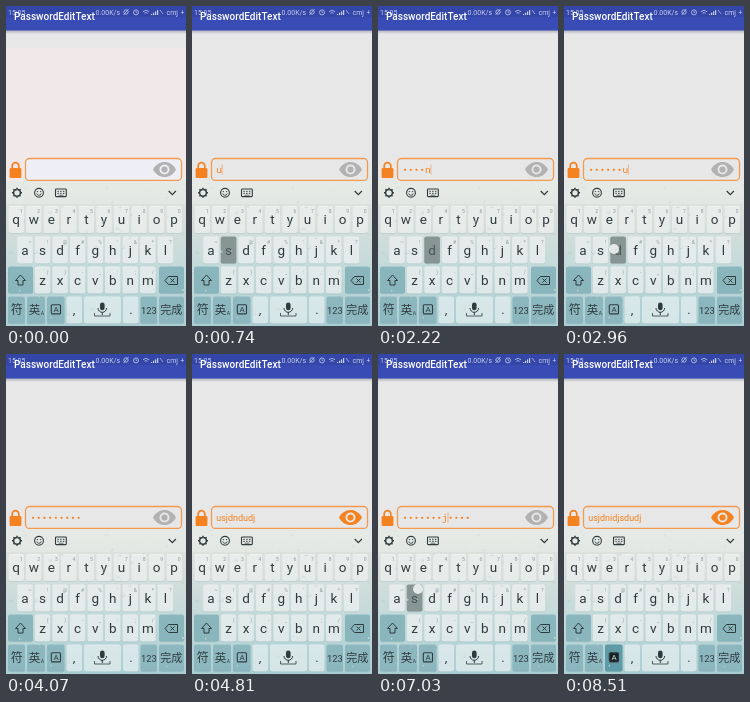
An HTML page with a canvas that plays this animation: 180x320 px, repeating every 8880 ms.

```html
<!DOCTYPE html>
<html lang="en">
<head>
<meta charset="utf-8">
<title>Password field</title>
<style>
html, body { margin: 0; width: 100%; height: 100%; overflow: hidden; background: #e7e7e7; }
canvas { display: block; width: 180px; height: 320px; }
</style>
</head>
<body>
<canvas id="stage"></canvas>
<script>
const canvas = document.getElementById('stage');
const ratio = window.devicePixelRatio || 1;
canvas.width = 180 * ratio;
canvas.height = 320 * ratio;
const c = canvas.getContext('2d');

const STEP = 370, STEPS = 24;
const ORANGE = '#f58220', INK = '#303b3e', PAPER = '#e7e7e7';
const FIRST = 'usjdndudj', ADDED = 'idjs', SPLIT = 5;
const CELL = 5.7, KEY_PITCH = 17.55;
const SANS = 'Roboto, sans-serif', MONO = '"Noto Sans Mono", monospace';
const CJK = '"Noto Sans CJK SC", "Noto Sans CJK", sans-serif';
// finger positions by step
const TOUCHES = { 4: [46, 237], 8: [50, 243], 17: [50, 248], 19: [40, 235] };

function text(s, x, y, size, color, { align = 'left', weight = 400, family = SANS } = {}) {
  c.font = `${weight} ${size}px ${family}`;
  c.textAlign = align;
  c.textBaseline = 'alphabetic';
  c.fillStyle = color;
  c.fillText(s, x, y);
}

function box(x, y, w, h, r, fill, stroke, width = 1) {
  c.beginPath();
  c.roundRect(x, y, w, h, r);
  if (fill) { c.fillStyle = fill; c.fill(); }
  if (stroke) { c.strokeStyle = stroke; c.lineWidth = width; c.stroke(); }
}

function disc(x, y, r, fill) {
  c.beginPath();
  c.arc(x, y, r, 0, 7);
  c.fillStyle = fill;
  c.fill();
}

function ring(x, y, r, color, width = 1, from = 0, to = 7) {
  c.beginPath();
  c.arc(x, y, r, from, to);
  c.strokeStyle = color;
  c.lineWidth = width;
  c.stroke();
}

function line(points, color, width = 1, close = false) {
  c.beginPath();
  points.forEach(([x, y]) => c.lineTo(x, y));
  if (close) c.closePath();
  c.strokeStyle = color;
  c.lineWidth = width;
  c.stroke();
}

function stateAt(step) {
  let value = '', recent = -1, pressed = '';
  if (step < 15) {
    const count = Math.max(0, Math.min(9, step - 1));
    value = FIRST.slice(0, count);
    if (step >= 2 && step <= 10) recent = count - 1;
    if (step >= 1 && step <= 9) pressed = FIRST[step - 1];
  } else {
    const count = Math.max(0, Math.min(4, step - 16));
    value = FIRST.slice(0, SPLIT) + ADDED.slice(0, count) + FIRST.slice(SPLIT);
    if (step >= 17 && step <= 20) recent = SPLIT + count - 1;
    if (step >= 16 && step <= 19 && step !== 17) pressed = ADDED[step - 16];
  }
  const shown = (step >= 12 && step <= 14) || step >= 22;
  const cursor = step === 15 || step === 16 ? SPLIT : recent + 1;
  return { step, value, recent, pressed, shown, cursor };
}

function drawHeader() {
  const shadow = c.createLinearGradient(0, 24, 0, 28);
  shadow.addColorStop(0, '#a9abb8');
  shadow.addColorStop(1, '#a9abb800');
  c.fillStyle = shadow;
  c.fillRect(0, 24, 180, 4);
  c.fillStyle = '#394cb5';
  c.fillRect(0, 0, 180, 24.5);
  c.fillStyle = '#3446a8';
  c.fillRect(0, 0, 180, 11);

  const pale = '#c6cdef';
  text('15:05', 2, 9, 7, pale);
  text('...0.00K/s', 84, 9, 7, pale);
  ring(120, 6, 2.2, pale, 0.8);
  line([[117.5, 9], [122.5, 3]], pale, 0.7);
  ring(130, 6.4, 2.5, pale, 0.8);
  line([[130, 4.8], [130, 6.5], [131.3, 6.5]], pale, 0.6);
  ring(140, 9, 4.5, pale, 0.8, -2.3, -0.8);
  ring(140, 9, 2.3, pale, 0.8, -2.3, -0.8);
  c.fillStyle = pale;
  for (let i = 0; i < 4; i++) c.fillRect(145 + i * 2, 8 - i * 1.3, 1.2, 1 + i * 1.3);
  line([[154, 4], [157, 8]], pale, 0.7);
  text('cmj', 160.5, 9, 7, pale);
  text('+', 174.5, 9, 6.5, pale);
  text('PasswordEditText', 8, 14.2, 10, '#fff', { weight: 500 });
}

function drawLock() {
  ring(9.5, 160, 3.3, ORANGE, 1.7, Math.PI, Math.PI * 2);
  line([[6.2, 160], [6.2, 163]], ORANGE, 1.7);
  line([[12.8, 160], [12.8, 163]], ORANGE, 1.7);
  box(3.6, 162, 11.8, 10, 1.2, ORANGE);
}

function drawEye(color, back) {
  c.beginPath();
  c.moveTo(147, 163.5);
  c.bezierCurveTo(152, 153.5, 165, 153.5, 170, 163.5);
  c.bezierCurveTo(165, 173.5, 152, 173.5, 147, 163.5);
  c.fillStyle = color;
  c.fill();
  disc(158.5, 163.5, 5, back);
  disc(158.5, 163.5, 3.1, color);
}

function drawField(s) {
  const back = s.step ? PAPER : '#eeeff6';
  drawLock();
  box(19.5, 152.5, 156, 22, 4, back, '#f29a50', 1.3);
  drawEye(s.shown ? ORANGE : '#b2b2b2', back);
  if (s.shown) {
    text(s.value, 24.2, 167, 9, ORANGE);
    return;
  }
  const left = 24.2;
  [...s.value].forEach((letter, i) => {
    const x = left + (i + 0.5) * CELL;
    if (i === s.recent) text(letter, x, 167, 9.5, ORANGE, { align: 'center', family: MONO });
    else disc(x, 163.8, 1.15, ORANGE);
  });
  if (s.cursor > 0) {
    const x = left + s.cursor * CELL + 0.2;
    line([[x, 158.5], [x, 168.5]], '#f4a66a', 0.8);
  }
}

function drawDrops() {
  let seed = 29;
  const random = () => (seed = (seed * 16807) % 2147483647) / 2147483647;
  for (let i = 0; i < 85; i++) {
    const x = random() * 180, y = 177 + random() * 140, r = 0.4 + random() * random() * 2;
    disc(x, y, r, 'rgba(120,155,155,.2)');
    disc(x - 0.3, y - 0.4, r * 0.65, 'rgba(255,255,255,.45)');
  }
}

function drawToolbar() {
  ring(11, 186.8, 3.4, INK, 1.5);
  for (let i = 0; i < 8; i++) {
    const a = i * Math.PI / 4, u = Math.cos(a), v = Math.sin(a);
    line([[11 + u * 3.5, 186.8 + v * 3.5], [11 + u * 5, 186.8 + v * 5]], INK, 1.5);
  }
  ring(33, 186.8, 4.4, INK, 1.1);
  disc(31.4, 185.6, 0.7, INK);
  disc(34.6, 185.6, 0.7, INK);
  ring(33, 187, 2.3, INK, 0.9, 0.2, 2.94);
  box(49.5, 183, 10.8, 7.6, 0.8, null, INK, 1.1);
  for (let i = 0; i < 6; i++) {
    c.fillStyle = INK;
    c.fillRect(51.3 + (i % 3) * 2.8, 184.8 + Math.floor(i / 3) * 2, 1.5, 1);
  }
  line([[52.5, 189.2], [57.5, 189.2]], INK, 0.7);
  line([[162.7, 185], [166.3, 188.7], [169.9, 185]], INK, 1.2);
}

function keyBack(x, y, w, fill, h = 27) {
  box(x, y + 0.7, w, h, 2, 'rgba(100,132,136,.2)');
  box(x, y, w, h, 2, fill);
}

function letterRow(letters, hints, start, y, pressed) {
  [...letters].forEach((letter, i) => {
    const x = start + i * KEY_PITCH, down = letter === pressed;
    keyBack(x - 7.8, y, 15.6, down ? '#879593' : 'rgba(250,250,249,.68)');
    text(hints[i], x + 5, y + 7, 5, '#8c9b9e', { align: 'center' });
    text(letter, x, y + 18, 13.5, down ? '#46575b' : INK, { align: 'center' });
  });
}

function drawShift() {
  line([[14.5, 269], [19.5, 274.5], [17, 274.5], [17, 279], [12, 279], [12, 274.5], [9.5, 274.5]], INK, 1, true);
}

function drawDelete() {
  line([[159, 274.5], [162.5, 270.5], [171.5, 270.5], [171.5, 278.5], [162.5, 278.5]], INK, 1, true);
  line([[164.5, 272.5], [168.5, 276.5]], INK, 1);
  line([[168.5, 272.5], [164.5, 276.5]], INK, 1);
}

function drawMic() {
  box(94, 296.5, 4.6, 7.8, 2.3, INK);
  ring(96.3, 302, 4.3, INK, 1, 0, Math.PI);
  line([[96.3, 306], [96.3, 309]], INK, 1);
  line([[88.5, 307], [88.5, 310], [104, 310], [104, 307]], INK, 0.8);
}

function drawBottomRow(active) {
  const teal = 'rgba(131,179,188,.72)', light = 'rgba(236,245,246,.72)';
  [[2, 17, teal], [21, 18, teal], [41, 17.5, active ? '#5e9ba6' : teal], [60.5, 15.5, light],
   [78, 37, light], [117, 15.5, light], [134.5, 16.5, teal], [153, 25, teal]]
    .forEach(([x, w, fill]) => keyBack(x, 290.5, w, fill));
  const center = { align: 'center', family: CJK };
  text('符', 10.8, 308, 12, INK, center);
  text('英', 28.5, 308, 11.5, INK, center);
  text('A', 36.5, 308.5, 5, INK, { align: 'center' });
  box(45.3, 298.7, 9.2, 9.2, 1, active ? '#182326' : null, INK, 1.1);
  text('A', 50, 306.2, 8, active ? '#d3e5e7' : INK, { align: 'center' });
  text(',', 68, 308, 13, INK, { align: 'center' });
  text('.', 125, 308, 13, INK, { align: 'center' });
  text('123', 142.8, 308, 9.3, INK, { align: 'center' });
  text('完成', 165.2, 308, 11, INK, center);
  drawMic();
}

function drawTouch(x, y) {
  disc(x, y + 0.6, 5.6, 'rgba(120,140,140,.25)');
  disc(x, y, 5, 'rgba(246,248,247,.85)');
}

function drawKeyboard(s) {
  const glass = c.createLinearGradient(0, 175, 0, 320);
  [[0, '#e0e5df'], [0.25, '#d9dfdb'], [0.55, '#c6dbda'], [1, '#abced3']]
    .forEach(([at, color]) => glass.addColorStop(at, color));
  c.fillStyle = glass;
  c.fillRect(0, 175, 180, 145);
  c.fillStyle = 'rgba(255,255,255,.2)';
  c.fillRect(0, 175, 180, 23);
  drawToolbar();
  letterRow('qwertyuiop', '1234567890', 10.2, 200, s.pressed);
  letterRow('asdfghjkl', "~!@#%'&*?", 19, 230.5, s.pressed);
  letterRow('zxcvbnm', '()-_:;/', 36.5, 260.5, s.pressed);
  keyBack(2, 260.5, 25, 'rgba(124,176,184,.72)');
  keyBack(153, 260.5, 25, 'rgba(124,176,184,.72)');
  drawShift();
  drawDelete();
  drawBottomRow(s.step === 23);
  drawDrops();
  if (TOUCHES[s.step]) drawTouch(...TOUCHES[s.step]);
}

function draw(step) {
  const s = stateAt(step);
  c.setTransform(ratio, 0, 0, ratio, 0, 0);
  c.fillStyle = PAPER;
  c.fillRect(0, 0, 180, 320);
  if (!step) {
    c.fillStyle = '#f0e8e9';
    c.fillRect(0, 42, 180, 133);
  }
  drawHeader();
  drawField(s);
  drawKeyboard(s);
}

const begin = performance.now();
function frame() {
  draw(Math.floor((performance.now() - begin) / STEP) % STEPS);
  requestAnimationFrame(frame);
}
frame();
</script>
</body>
</html>
```
